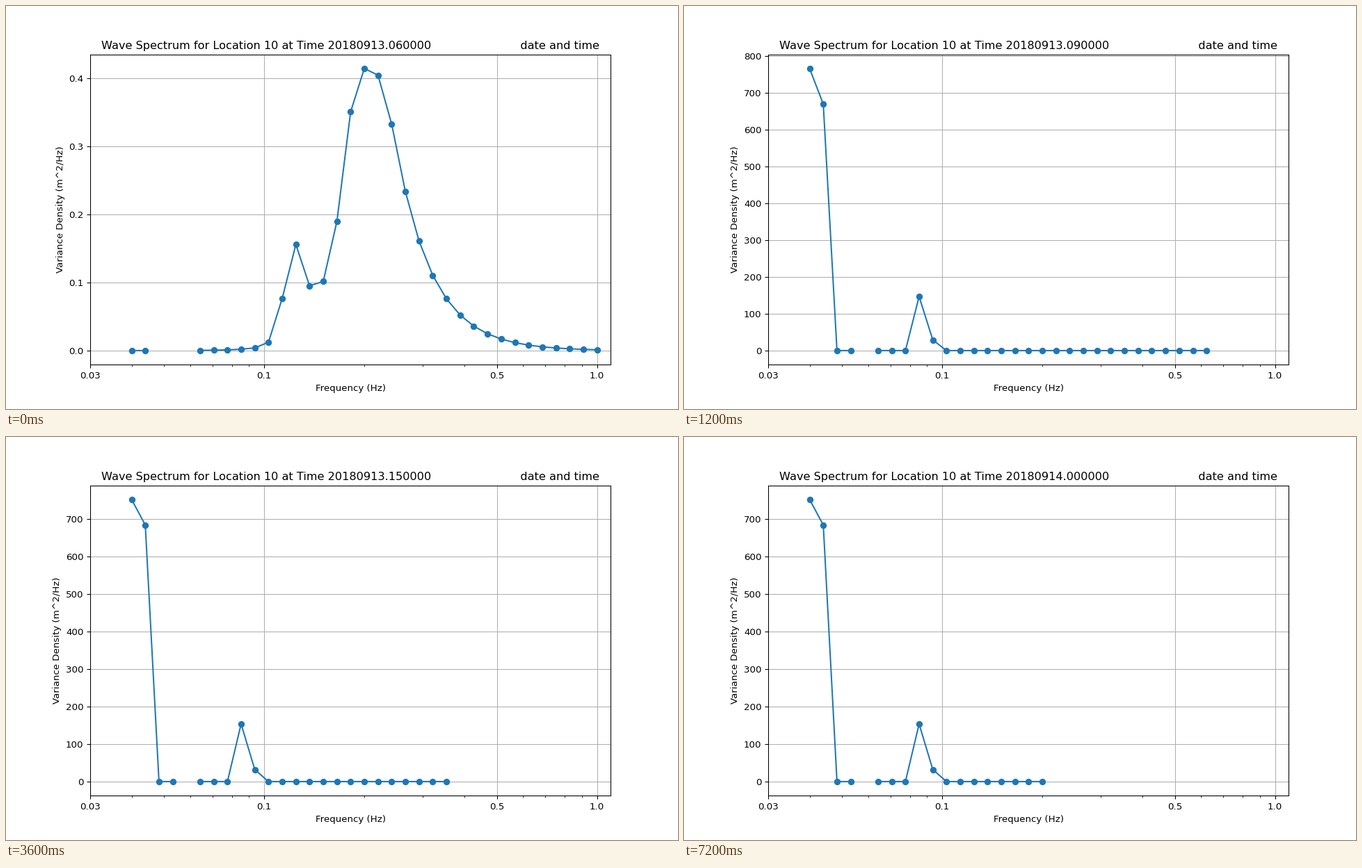
A matplotlib script that plays this animation: 966x580 px, repeating every 7600 ms.

```python
import numpy as np
import matplotlib.pyplot as plt
from matplotlib.animation import FuncAnimation
from matplotlib.ticker import NullFormatter

plt.rcParams["font.family"] = "DejaVu Sans"

HOURS = 19
BINS = np.arange(35)
FREQS = np.geomspace(0.04, 1.0, BINS.size)


def wind_sea():
    """Rounded peak between an exponential rise and fall, plus a narrow swell bump."""
    rise = 0.19 * np.exp(0.65 * (BINS - 15))
    fall = 0.234 * np.exp(-0.375 * (BINS - 20))
    crest = 0.416
    sea = (rise**-8 + fall**-8 + crest**-8) ** (-1 / 8)
    swell = 0.13 * np.exp(-((BINS - 11.9) / 1.05) ** 2)
    density = sea + swell
    density[:2] = 0
    density[2:5] = np.nan
    return density


def settle(start, end, rate, elapsed):
    return end + (start - end) * np.exp(-(rate * elapsed) ** 1.65)


def swell_only(elapsed):
    """Long-wave energy settling while the short waves drop out."""
    density = np.zeros(BINS.size)
    density[0] = settle(786.4, 751.4, 0.452, elapsed)
    density[1] = settle(590, 683.3, 0.74, elapsed)
    density[8] = settle(81.5, 153.3, 0.85, elapsed)
    density[9] = settle(26.5, 32, 0.365, elapsed)
    density[4] = np.nan
    dropped = int(3.37 * elapsed**0.572)
    density[BINS.size - dropped:] = np.nan
    return density


def spectrum(hour):
    return wind_sea() if hour == 0 else swell_only(hour - 1)


def title_text(hour):
    days, clock = divmod(6 + hour, 24)
    stamp = f"{20180913 + days}.{clock:02d}0000"
    return f"Wave Spectrum for Location 10 at Time {stamp}" + " " * 25 + "date and time"


# 966 x 580 pixels
fig, ax = plt.subplots(figsize=(10, 6.0042), dpi=96.6)
fig.subplots_adjust(left=0.125, right=0.9, bottom=0.11, top=0.88)
line, = ax.plot(FREQS, spectrum(0), "-o", color="#1f77b4")
ax.set_xscale("log")
ax.set_xlim(0.03, 1.1)
ax.set_xticks([0.03, 0.1, 0.5, 1.0], ["0.03", "0.1", "0.5", "1.0"])
ax.xaxis.set_minor_formatter(NullFormatter())
ax.set_xlabel("Frequency (Hz)")
ax.set_ylabel("Variance Density (m^2/Hz)")
ax.grid(True)


def update(hour):
    density = spectrum(hour)
    peak = np.nanmax(density)
    line.set_ydata(density)
    ax.set_ylim(-0.05 * peak, 1.05 * peak)
    ax.set_title(title_text(hour))
    return line,


anim = FuncAnimation(fig, update, frames=HOURS, interval=400,
                     repeat=True, repeat_delay=0, blit=False)
plt.show()
```
